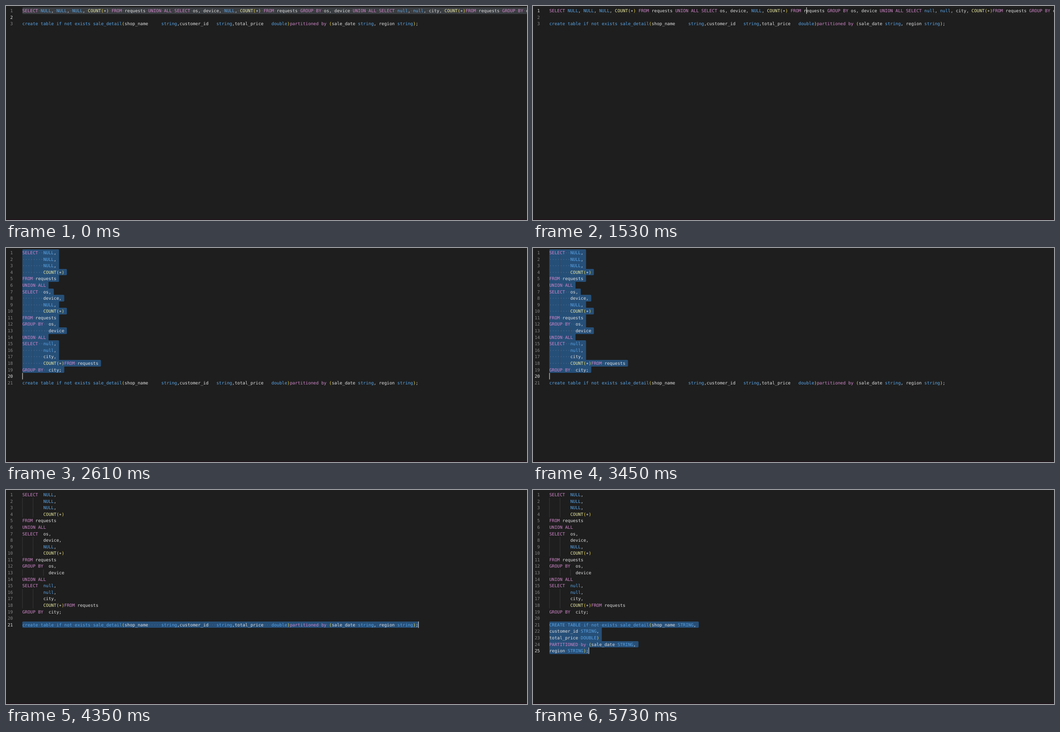
Write an HTML page with a canvas that moves like this. It is 1165 px wide and 480 px high and loops after 6.06 s.

```html
<!DOCTYPE html>
<html lang="en">
<head>
<meta charset="utf-8">
<title>SQL formatting in an editor</title>
<style>
  html, body { margin: 0; width: 100%; height: 100%; overflow: hidden; background: #1e1e1e; }
  canvas { display: block; }
</style>
</head>
<body>
<canvas id="stage" width="1165" height="480"></canvas>
<script>
const ctx = document.getElementById('stage').getContext('2d');
const LOOP = 6060, BLINK = 450;
const LEFT = 36.5, TOP = 3, CHAR = 5.864, ROW = 14.59, BASE = 11;
const INK = '#e0e0e0', GOLD = '#fadf45';

const query = 'SELECT NULL, NULL, NULL, COUNT(*) FROM requests UNION ALL SELECT os, device, NULL, COUNT(*) ' +
  'FROM requests GROUP BY os, device UNION ALL SELECT null, null, city, COUNT(*)FROM requests GROUP BY city;';
const create = 'create table if not exists sale_detail(shop_name     string,customer_id   string,' +
  'total_price   double)partitioned by (sale_date string, region string);';
const queryRows = `SELECT  NULL,
        NULL,
        NULL,
        COUNT(*)
FROM requests
UNION ALL
SELECT  os,
        device,
        NULL,
        COUNT(*)
FROM requests
GROUP BY  os,
          device
UNION ALL
SELECT  null,
        null,
        city,
        COUNT(*)FROM requests
GROUP BY  city;`.split('\n');
const createRows = `CREATE TABLE if not exists sale_detail(shop_name STRING,
customer_id STRING,
total_price DOUBLE)
PARTITIONED by (sale_date STRING,
region STRING);`.split('\n');

const raw = [query, '', create];
const half = [...queryRows, '', create];
const done = [...queryRows, '', ...createRows];

// rows: fully selected rows; word: selected word; plain: time until colours arrive
const states = [
  { at: 0, lines: raw, caret: [1, 0], rows: [0, 0], blurred: true },
  { at: 1380, lines: raw, caret: [0, 98] },
  { at: 1560, lines: raw, caret: [0, 105], word: 'requests' },
  { at: 1740, lines: raw, caret: [1, 0], rows: [0, 0] },
  { at: 2550, lines: half, caret: [19, 0], rows: [0, 18], plain: 30 },
  { at: 3870, lines: half, caret: [20, 41], brackets: [38, 101] },
  { at: 4020, lines: half, caret: [20, 48], word: 'shop_name' },
  { at: 4200, lines: half, caret: [20, create.length], rows: [20, 20] },
  { at: 4830, lines: done, caret: [24, 15], rows: [20, 24], plain: 30 }
];

const colX = col => LEFT + col * CHAR;
const rowY = row => TOP + row * ROW;

function box(color, x, y, w, h) {
  ctx.fillStyle = color;
  ctx.fillRect(x, y, w, h);
}

function label(text, x, row, color) {
  ctx.fillStyle = color;
  ctx.fillText(text, x, rowY(row) + BASE + (text === '*' ? 1.8 : 0));
}

function tokenColor(token, plain) {
  if (/[()]/.test(token)) return GOLD;
  if (plain) return INK;
  if (token === 'COUNT') return '#ececa4';
  if (/^(select|from|union|all|group|by|partitioned)$/i.test(token)) return '#cf86c9';
  if (/^(null|create|table|if|not|exists|sale_detail|string|double)$/i.test(token)) return '#5aa5e6';
  return INK;
}

function drawRowSelection({ lines, rows: [first, last], blurred }) {
  const width = row => row < first || row > last ? 0 :
    (lines[row].length + (row < lines.length - 1 ? 1 : 0)) * CHAR;
  ctx.fillStyle = blurred ? '#3a3d41' : '#264f78';
  ctx.beginPath();
  for (let row = first; row <= last; row++) {
    const w = width(row), y = Math.round(rowY(row));
    ctx.roundRect(LEFT, y, w, Math.round(rowY(row + 1)) - y, [
      row === first ? 2 : 0,
      width(row - 1) < w ? 2 : 0,
      width(row + 1) < w ? 2 : 0,
      row === last ? 2 : 0
    ]);
  }
  ctx.fill();
}

function drawWordSelection({ lines, caret: [row, end], word }) {
  lines.forEach((line, i) => {
    for (const { index } of line.matchAll(word)) {
      const picked = i === row && index + word.length === end;
      box(picked ? '#264f78' : 'rgba(173,214,255,.15)', colX(index), rowY(i), word.length * CHAR, ROW);
    }
  });
}

function drawLine(line, row, selected, plain) {
  const indent = line.search(/\S/);
  for (let col = 0; col < indent; col += 4) {
    box(selected ? 'rgba(64,64,64,.6)' : '#404040', colX(col), rowY(row), 0.8, ROW);
  }
  for (const { 0: token, index } of line.matchAll(/\w+|[^\w\s]| /g)) {
    if (token !== ' ') label(token, colX(index), row, tokenColor(token, plain));
    else if (selected) label('·', colX(index), row, 'rgba(227,228,226,.25)');
  }
}

function draw(time) {
  const state = states.findLast(s => s.at <= time);
  const { lines, caret: [row, col], rows, word, brackets } = state;
  const age = time - state.at;
  const isSelected = i => !!rows && i >= rows[0] && i <= rows[1];

  box('#1e1e1e', 0, 0, 1165, 480);
  box('#20151b', 0, 478, 1165, 2);
  if (rows) drawRowSelection(state);
  else if (word) drawWordSelection(state);
  else {
    box('#252525', LEFT, Math.round(rowY(row)), 1128, 1);
    box('#252525', LEFT, Math.round(rowY(row + 1)) - 1, 1128, 1);
  }

  ctx.font = '9.74px "DejaVu Sans Mono", monospace';
  ctx.textRendering = 'geometricPrecision';
  lines.forEach((line, i) => {
    const number = String(i + 1);
    label(number, 15.4 - number.length * CHAR, i, i === row ? '#e2e2e2' : '#858585');
    drawLine(line, i, isSelected(i), isSelected(i) && age < state.plain);
  });

  ctx.strokeStyle = '#888';
  ctx.lineWidth = 0.8;
  for (const at of brackets || []) ctx.strokeRect(colX(at) + 0.2, rowY(row) + 0.5, CHAR - 0.4, ROW - 1);
  if (!state.blurred && Math.floor(age / BLINK) % 2 === 0) {
    box('#cfcfcd', colX(col) - 0.2, rowY(row), 1.3, ROW);
  }
}

function tick() {
  draw(performance.now() % LOOP);
  requestAnimationFrame(tick);
}
tick();
</script>
</body>
</html>
```
